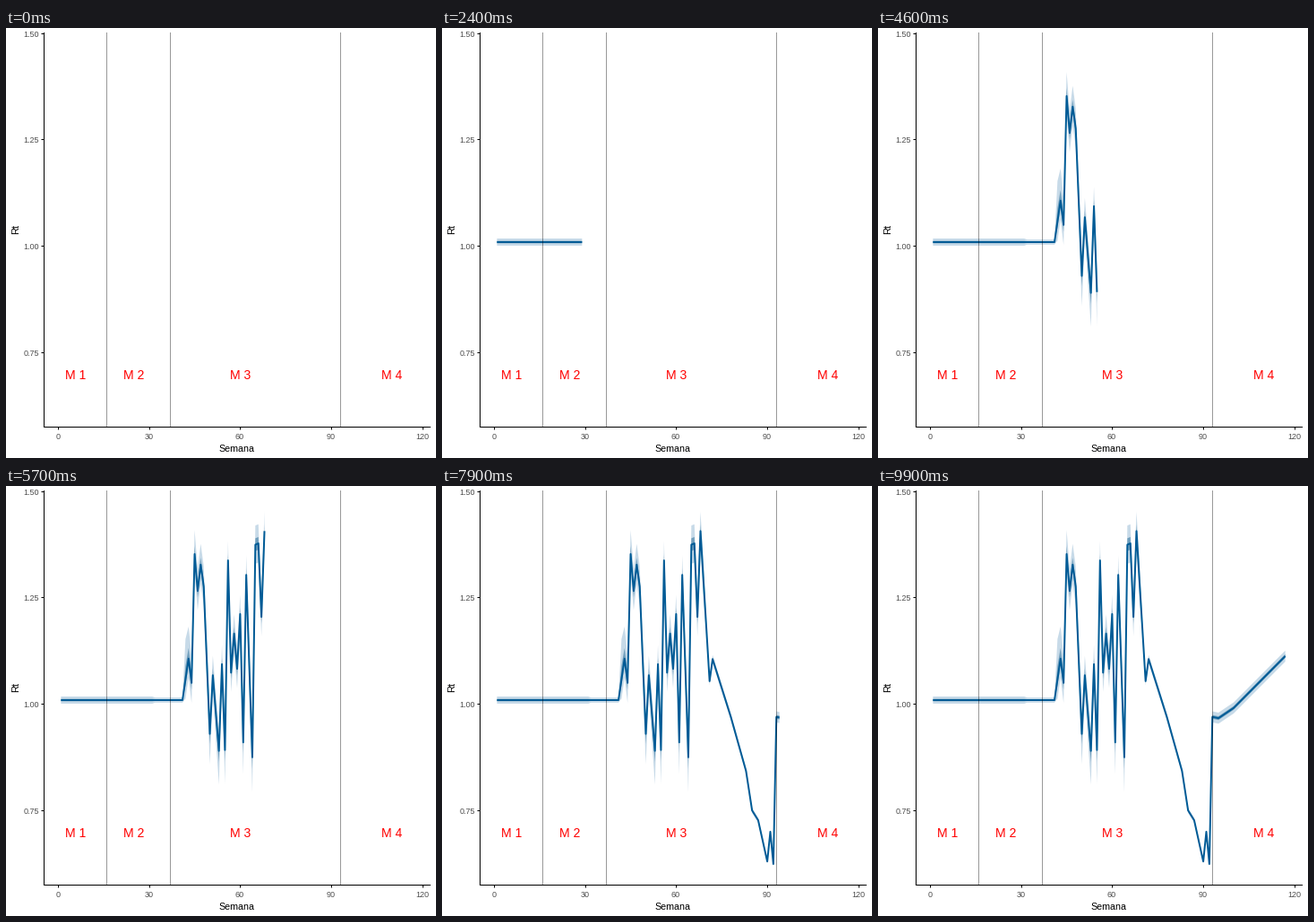
Write a matplotlib script that moves like this. It is 480 by 480 pixels and loops after 10000 ms.

```python
import numpy as np
import matplotlib
import matplotlib.pyplot as plt
from matplotlib.animation import FuncAnimation
from matplotlib.patches import Polygon

matplotlib.rcParams["font.family"] = "Liberation Sans"

SIZE, DPI = 480, 72
FRAMES, STEP_MS = 100, 100
LAST_WEEK = 117
LEFT, RIGHT, TOP, BOTTOM = 42.5, 474, 5, 445.5
BLUE, MID, LIGHT = "#005b96", "#6f9ebc", "#c7dae8"
GREY, RED = "#4d4d4d", "#ff0000"


def px(week):
    return 58 + 3.39 * np.asarray(week, float)


def py(value):
    return 243.5 - 474.7 * (np.asarray(value, float) - 1)


def pixel(v):
    """Centre of the pixel that holds v."""
    return np.floor(v) + 0.5


# The estimate runs straight between its turning points.
TURNS = [
    (1, 1.0095), (41, 1.0095), (43, 1.107), (44, 1.05), (45, 1.353),
    (46, 1.266), (47, 1.328), (48, 1.277), (50, 0.93), (51, 1.068),
    (53, 0.89), (54, 1.094), (55, 0.892), (56, 1.338), (57, 1.074),
    (58, 1.166), (59, 1.083), (60, 1.212), (61, 0.91), (62, 1.304),
    (64, 0.875), (65, 1.375), (66, 1.378), (67, 1.205), (68, 1.407),
    (71, 1.054), (72, 1.106), (78, 0.97), (83, 0.843), (85, 0.75),
    (87, 0.727), (90, 0.63), (91, 0.70), (92, 0.624), (93, 0.97),
    (95, 0.967), (100, 0.991), (117, 1.113),
]
weeks = np.arange(1, LAST_WEEK + 1)
mean = np.interp(weeks, *zip(*TURNS))

# Outer band: thin while flat, wide while volatile, wider below in troughs.
volatile = (weeks > 41) & (weeks < 70)
spread = np.select(
    [weeks <= 31, weeks <= 41, volatile, weeks <= 92],
    [0.0084, 0.006, 0.045, np.interp(weeks, [70, 92], [0.010, 0.004])],
    0.013)
onset = 0.05 * np.exp(-np.abs(weeks - 42) / 2)
trough = 0.2 * np.clip(1.06 - mean, 0, 0.2)
up = spread + volatile * onset
down = spread + volatile * trough

# Step at which each week shows; some steps reveal two.
appears = np.round((weeks - 1) * (FRAMES - 1) / (LAST_WEEK - 1))

fig = plt.figure(figsize=(SIZE / DPI, SIZE / DPI), dpi=DPI, facecolor="white")
ax = fig.add_axes([0, 0, 1, 1])
ax.set_xlim(0, SIZE)
ax.set_ylim(SIZE, 0)
ax.axis("off")


def rule(x0, y0, x1, y1, color="black", **style):
    ax.plot([x0, x1], [y0, y1], color=color, lw=1, snap=False,
            solid_capstyle="butt", **style)


def label(x, y, text, size, color="black", ha="center", **style):
    ax.text(x, y, text, fontsize=size, color=color, ha=ha,
            va="center_baseline", **style)


def band(color, zorder):
    return ax.add_patch(Polygon(np.zeros((3, 2)), closed=True, lw=0,
                                facecolor=color, snap=False, zorder=zorder))


rule(LEFT, TOP, LEFT, BOTTOM + 0.5)
rule(LEFT - 0.5, BOTTOM, RIGHT, BOTTOM)

for week in range(0, 121, 30):
    x = pixel(px(week) + 0.3)
    rule(x, BOTTOM, x, BOTTOM + 3)
    label(x - 0.8, 455.5, str(week), 9, GREY)

for value in (0.75, 1.0, 1.25, 1.5):
    y = pixel(py(value))
    rule(LEFT - 3, y, LEFT, y)
    label(37.3, y + 0.3, f"{value:.2f}", 9, GREY, ha="right")

label(257.5, 469, "Semana", 10.6)
ax.text(11.5, 225, "Rt", fontsize=11, rotation=90, ha="center", va="center")

for week in (16, 37, 93):
    x = pixel(px(week) + 0.3)
    rule(x, TOP, x, BOTTOM - 0.5, alpha=0.4, zorder=5)

for n, week in enumerate((5.8, 25, 60, 110), 1):
    label(px(week), 386.7, f"M {n}", 14, RED, zorder=6)

outer = band(LIGHT, 2)
inner = band(MID, 3)
line, = ax.plot([], [], color=BLUE, lw=2, snap=False, zorder=4,
                solid_capstyle="butt", solid_joinstyle="round")


def fill(shape, n, scale):
    x = px(weeks[:n])
    high = py(mean[:n] + scale * up[:n])
    low = py(mean[:n] - scale * down[:n])
    shape.set_xy(np.column_stack([np.r_[x, x[::-1]], np.r_[high, low[::-1]]]))


def draw(i):
    n = np.count_nonzero(appears <= i)
    fill(outer, n, 1)
    fill(inner, n, 1 / 3)
    line.set_data(px(weeks[:n]), py(mean[:n]))
    return outer, inner, line


anim = FuncAnimation(fig, draw, frames=FRAMES, interval=STEP_MS,
                     repeat=True, repeat_delay=0, blit=False)
plt.show()
```
